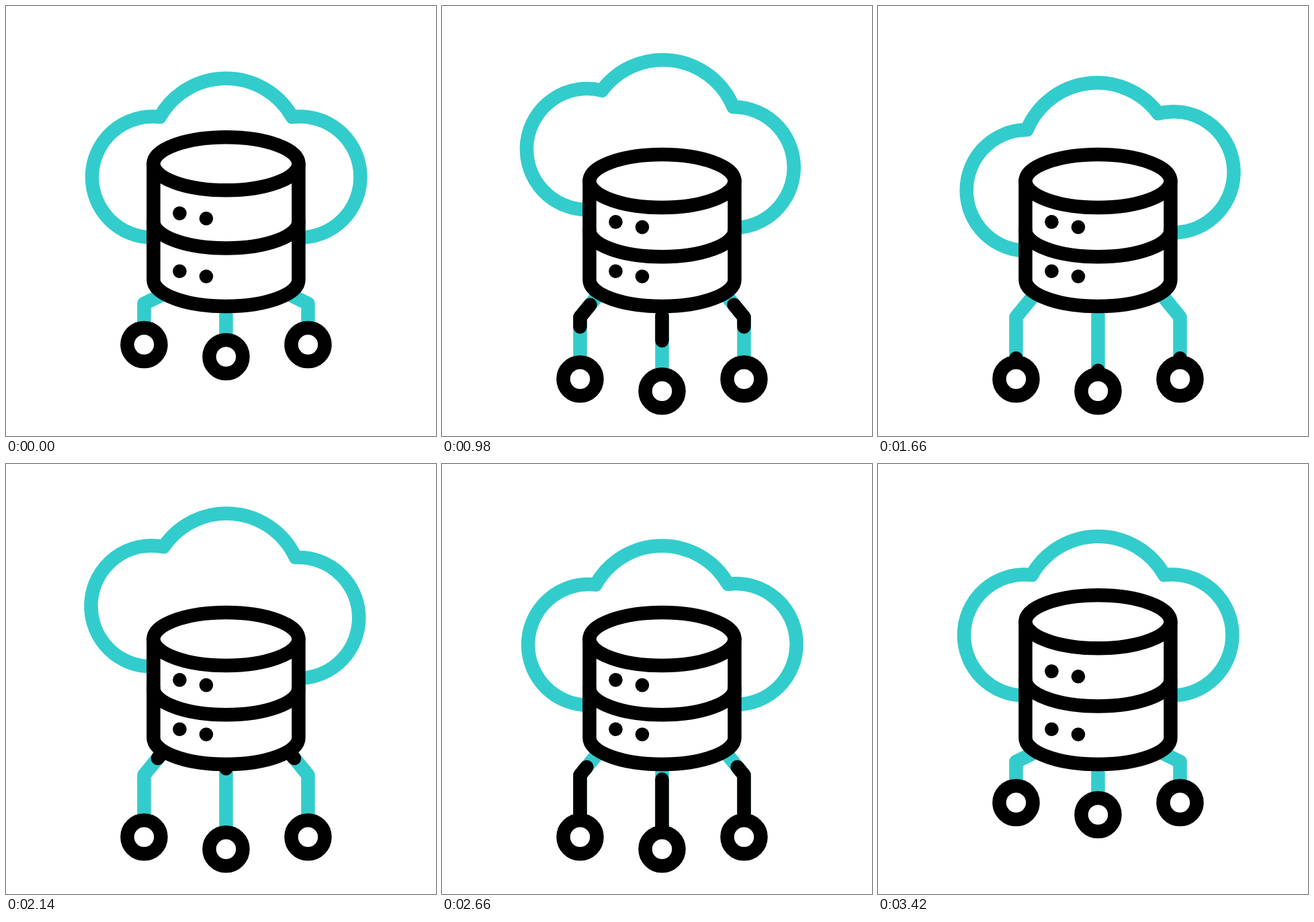
Recreate the animation shown at these times as an HTML page. Size 640x640 px, loop 3.6 s.

```html
<!DOCTYPE html>
<html lang="en">
<head>
<meta charset="utf-8">
<title>Cloud database</title>
<style>
  html, body { margin: 0; width: 100%; height: 100%; overflow: hidden; background: #fff; }
  svg { display: block; width: 100%; height: 100%; }
  .line { fill: none; stroke-width: 20.5; stroke-linecap: round; stroke-linejoin: round; }
  .teal { stroke: #33cccc; }
  .ink { stroke: #000; }
  .solid { fill: #fff; }
</style>
</head>
<body>
<svg viewBox="0 0 640 640">
  <path id="cloud" class="line teal" d="M229 165.2 A90 90 0 0 0 128 254.5 A90 90 0 0 0 218 344.5 H437.5
    A90 90 0 0 0 527.5 254.5 A90 90 0 0 0 426 165.2 A113.2 113.2 0 0 0 229 165.2 Z"/>
  <g id="legs"></g>
  <path id="body" class="line ink solid"/>
  <path id="band" class="line ink"/>
  <ellipse id="lid" class="line ink solid" cx="327.5" rx="108" ry="39.5"/>
  <g id="dots">
    <circle cx="258.5" r="10.3"/><circle cx="298" r="10.3"/>
    <circle cx="258.5" r="10.3"/><circle cx="298" r="10.3"/>
  </g>
  <g id="rings"></g>
</svg>
<script>
const LOOP = 3600;
const NS = 'http://www.w3.org/2000/svg';
const $ = id => document.getElementById(id);

function add(parent, tag, attrs) {
  const el = document.createElementNS(NS, tag);
  set(el, attrs);
  parent.appendChild(el);
  return el;
}

function set(el, attrs) {
  for (const k in attrs) el.setAttribute(k, attrs[k]);
}

// Eased 0..1 progress between two times
function ease(t, a, b) {
  const u = Math.min(1, Math.max(0, (t - a) / (b - a)));
  return u * u * (3 - 2 * u);
}

// Eased value through [time, value] keys
function track(t, keys) {
  let v = keys[0][1];
  for (let i = 1; i < keys.length; i++) {
    const [a, from] = keys[i - 1], [b, to] = keys[i];
    v += (to - from) * ease(t, a, b);
  }
  return v;
}

const lift = [[195, 0], [835, -34.5], [1475, 17], [2115, -34.5], [2755, 17], [3400, 0]];
const tilt = [[200, 0], [987, 7.1], [1653, -7.1], [2320, 7.1], [2987, -7.1], [3400, 0]];
const stretch = [[195, 0], [835, 1], [2900, 1], [3400, 0]];

// Each pulse: head start, head end, tail start, tail end
const pulses = [[720, 1240, 720, 1820], [2060, 2600, 2540, 2940]];

const legs = [-1, 0, 1].map(side => ({
  side,
  x: 327.5 + side * 122,
  wire: add($('legs'), 'path', { class: 'line teal' }),
  pulse: add($('legs'), 'path', { class: 'line ink' }),
  ring: add($('rings'), 'circle', { class: 'line ink solid', cx: 327.5 + side * 122, r: 25 })
}));

function drawLeg(leg, s, head, tail) {
  const y = (leg.side ? 504 : 522) + 51.3 * s;
  const end = y - 25;
  let d = `M327.5 447 V${end}`;
  let length = end - 447;
  if (leg.side) {
    const x0 = 327.5 + leg.side * 97.5;
    const y0 = 431 + 2 * s;
    const knee = 443 + 20 * s;
    d = `M${x0} ${y0} L${leg.x} ${knee} V${end}`;
    length = Math.hypot(leg.x - x0, knee - y0) + end - knee;
  }
  set(leg.wire, { d });
  set(leg.ring, { cy: y });
  const shown = head > tail + 0.001;
  set(leg.pulse, {
    d,
    visibility: shown ? 'visible' : 'hidden',
    'stroke-dasharray': `${Math.max(0.01, (head - tail) * length)} 999`,
    'stroke-dashoffset': -tail * length
  });
}

function draw(t) {
  set($('cloud'), {
    transform: `translate(0 ${track(t, lift)}) rotate(${track(t, tilt)} 327.5 231)`
  });

  const s = track(t, stretch);
  const top = 234.8 + 25.7 * s;
  const mid = 321 + 12.8 * s;
  const arc = 'A108 39.5 0 0 0 435.5';
  set($('body'), { d: `M219.5 ${top} V407.5 ${arc} 407.5 V${top}` });
  set($('band'), { d: `M219.5 ${mid} ${arc} ${mid}` });
  set($('lid'), { cy: top });
  const rows = [mid - 12.4, mid - 4.7, 394.8, 402.5];
  [...$('dots').children].forEach((dot, i) => set(dot, { cy: rows[i] }));

  const [a, b, c, d] = pulses[t < 1940 ? 0 : 1];
  const head = ease(t, a, b), tail = ease(t, c, d);
  legs.forEach(leg => drawLeg(leg, s, head, tail));
}

const start = performance.now();
function tick() {
  draw((performance.now() - start) % LOOP);
  requestAnimationFrame(tick);
}
tick();
</script>
</body>
</html>
```
